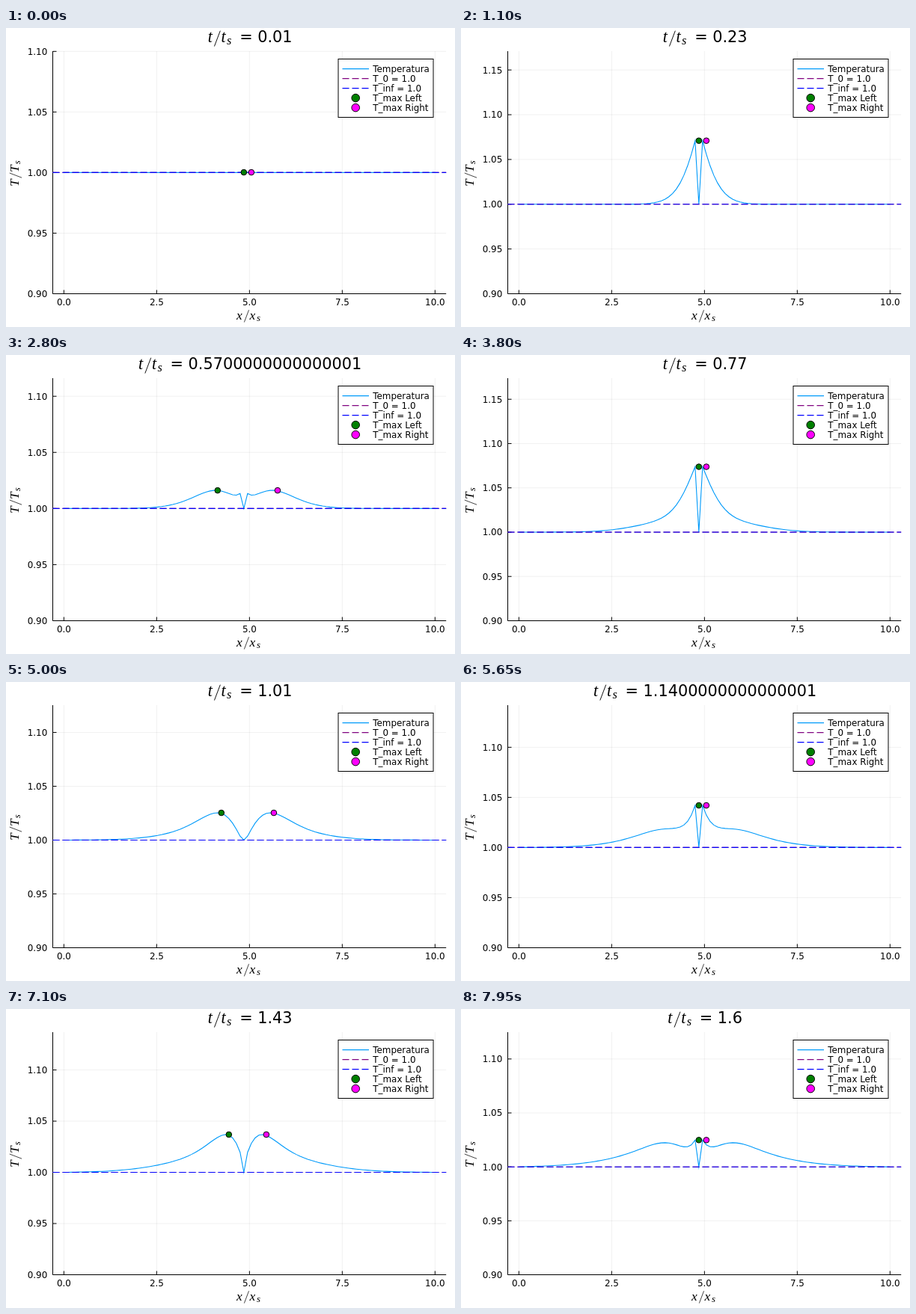
Recreate the animation shown at these times as an HTML page with a canvas. Size 600 by 400 pixels, loop 8 s.

```html
<!DOCTYPE html>
<html lang="en">
<head>
<meta charset="utf-8">
<title>Temperature profile</title>
<style>
  html, body { margin: 0; width: 100%; height: 100%; overflow: hidden; background: #fff; }
  canvas { display: block; }
</style>
</head>
<body>
<canvas id="plot" width="600" height="400"></canvas>
<script>
const ctx = document.getElementById('plot').getContext('2d');
const SANS = '"DejaVu Sans", sans-serif';
const SERIF = '"Liberation Serif", "Times New Roman", serif';
const STEPS = 160, STEP_MS = 50, DT = 0.01;
const NODES = 100, GAP = 48, DX = 10 / (NODES - 1);
const FRAME = { left: 62.5, right: 588.2, top: 31, bottom: 355.5 };
const DASH = [9, 4];

// Heat equation on one side of the gap: driven film at the near end, fixed far end.
const AMPLITUDE = 0.0803, FILM = 0.052, SUBSTEPS = 10;

function simulate(count) {
  let u = new Float64Array(count);
  const history = [], dt = DT / SUBSTEPS, r = dt / DX ** 2;
  for (let n = 1; n <= STEPS * SUBSTEPS; n++) {
    const drive = AMPLITUDE * Math.sin(2 * Math.PI * n * dt) ** 2;
    const next = new Float64Array(count);
    next[0] = u[0] + 2 * r * (u[1] - u[0] + DX / FILM * (drive - u[0]));
    for (let i = 1; i < count - 1; i++) next[i] = u[i] + r * (u[i - 1] - 2 * u[i] + u[i + 1]);
    u = next;
    if (n % SUBSTEPS === 0) history.push(Array.from(u));
  }
  return history;
}

const leftSide = simulate(GAP), rightSide = simulate(NODES - GAP - 1);

const xPos = x => FRAME.left + (x + 0.3) / 10.6 * (FRAME.right - FRAME.left);

function line(points, color, width = 1, dash = []) {
  ctx.beginPath();
  points.forEach(([x, y]) => ctx.lineTo(x, y));
  ctx.strokeStyle = color;
  ctx.lineWidth = width;
  ctx.setLineDash(dash);
  ctx.stroke();
  ctx.setLineDash([]);
}

function dot(x, y, radius, color) {
  ctx.beginPath();
  ctx.arc(x, y, radius, 0, 2 * Math.PI);
  ctx.fillStyle = color;
  ctx.fill();
  ctx.strokeStyle = '#000';
  ctx.lineWidth = 1;
  ctx.stroke();
}

function text(str, x, y, size = 11.9, align = 'left', font = SANS, style = '') {
  ctx.font = `${style} ${size}px ${font}`;
  ctx.textAlign = align;
  ctx.fillStyle = '#000';
  ctx.fillText(str, x, y);
}

// A ratio such as t/t_s in italics; advance is the letter width in em.
function ratio(letter, x, y, size, advance) {
  const glyph = (str, at, drop, scale) =>
    text(str, x + at * size, y + drop * size, size * scale, 'left', SERIF, 'italic');
  glyph(letter, 0, 0, 1.06);
  const slash = x + advance * size;
  line([[slash + 0.06 * size, y + 0.25 * size], [slash + 0.44 * size, y - 0.75 * size]], '#000', size * 0.045);
  glyph(letter, advance + 0.5, 0, 1.06);
  glyph('s', 2 * advance + 0.5, 0.15, 0.78);
}

function drawTitle(time) {
  const label = '= ' + time, size = 20.8, lead = 43.5;
  ctx.font = `${size}px ${SANS}`;
  const start = 325.6 - (lead + ctx.measureText(label).width) / 2;
  ratio('t', start + 1, 19.3, size, 0.361);
  text(label, start + lead, 19.3, size);
}

function drawAxes(top, yPos) {
  const { left, right, bottom } = FRAME, grid = 'rgba(0,0,0,.1)';
  for (let x = 0; x <= 10; x += 2.5) {
    const px = xPos(x);
    line([[px, FRAME.top], [px, bottom]], grid, 0.6);
    line([[px, bottom], [px, bottom - 5]], '#000');
    text(x.toFixed(1), px, 371.3, 11.9, 'center');
  }
  for (let i = 0; 0.9 + i * 0.05 <= top; i++) {
    const y = 0.9 + i * 0.05, py = yPos(y);
    line([[left, py], [right, py]], grid, 0.6);
    line([[left, py], [left + 5, py]], '#000');
    text(y.toFixed(2), 55.2, py + 4.4, 11.9, 'right');
  }
  line([[left, FRAME.top], [left, bottom], [right, bottom]], '#000');
  ratio('x', 308, 389.5, 16.35, 0.572);
  ctx.save();
  ctx.translate(17, 212);
  ctx.rotate(-Math.PI / 2);
  ratio('T', 0, 0, 16.35, 0.66);
  ctx.restore();
}

function drawLegend() {
  ctx.fillStyle = '#fff';
  ctx.fillRect(444, 41.5, 127, 78);
  ctx.strokeStyle = '#000';
  ctx.lineWidth = 1;
  ctx.strokeRect(444, 41.5, 127, 78);
  const rows = [
    ['Temperatura', '#009afa', []], ['T_0 = 1.0', '#800080', DASH], ['T_inf = 1.0', '#0000ff', DASH],
    ['T_max Left', '#008000'], ['T_max Right', '#ff00ff']
  ];
  rows.forEach(([label, color, dash], i) => {
    const y = 54.6 + i * 13;
    if (dash) line([[449.5, y], [485, y]], color, 1.1, dash);
    else dot(467.2, y, 5.3, color);
    text(label, 490.3, y + 4.4);
  });
}

function draw(step) {
  const left = leftSide[step], right = rightSide[step];
  const profile = [...left].reverse().concat(0, right);
  const peakLeft = Math.max(...left), peakRight = Math.max(...right);
  const top = 1.1 + Math.max(peakLeft, peakRight);
  const yPos = y => FRAME.bottom - (y - 0.9) / (top - 0.9) * (FRAME.bottom - FRAME.top);

  ctx.fillStyle = '#fff';
  ctx.fillRect(0, 0, 600, 400);
  drawAxes(top, yPos);
  drawTitle((step + 1) * DT);

  line(profile.map((u, i) => [xPos(i * DX), yPos(1 + u)]), '#009afa', 1.1);
  for (const color of ['#800080', '#0000ff'])
    line([[FRAME.left, yPos(1)], [FRAME.right, yPos(1)]], color, 1.1, DASH);

  // Markers sit one node to the right of each maximum.
  dot(xPos((GAP - left.indexOf(peakLeft)) * DX), yPos(1 + peakLeft), 3.8, '#008000');
  dot(xPos((GAP + 2 + right.indexOf(peakRight)) * DX), yPos(1 + peakRight), 3.8, '#ff00ff');
  drawLegend();
}

function tick() {
  draw(Math.floor(performance.now() / STEP_MS) % STEPS);
  requestAnimationFrame(tick);
}
draw(0);
requestAnimationFrame(tick);
</script>
</body>
</html>
```
